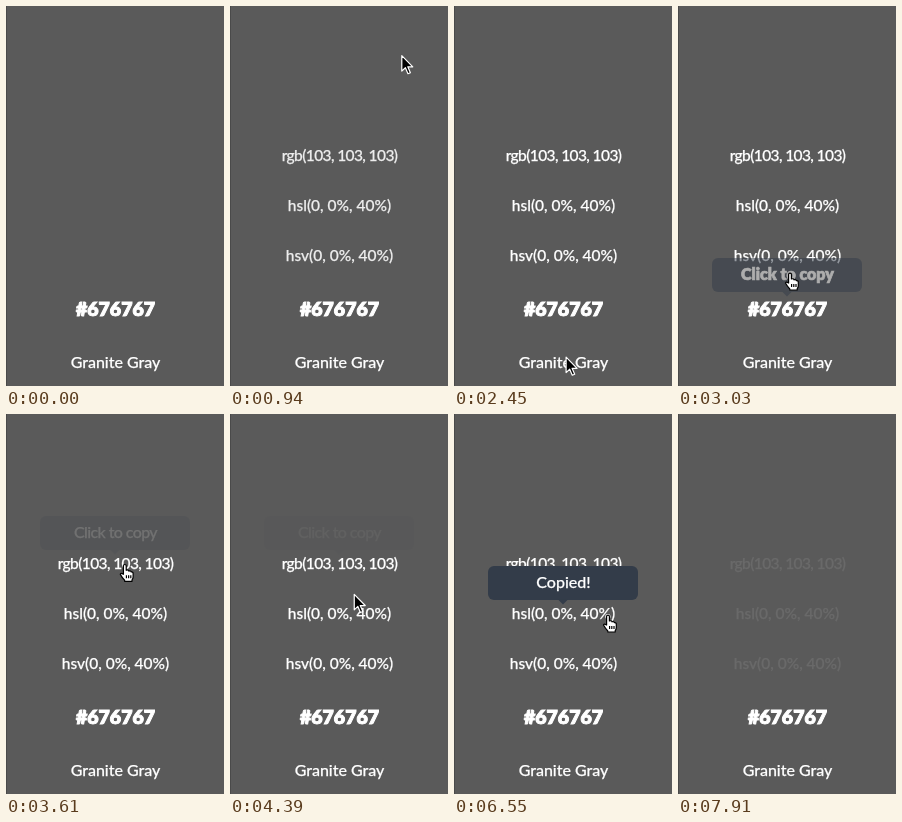
Animation, 218 px wide and 380 px high, one loop 8240 ms. Source, as an HTML page:

```html
<!DOCTYPE html>
<html lang="en">
<head>
<meta charset="utf-8">
<title>Color card</title>
<style>
  html, body { margin: 0; width: 100%; height: 100%; overflow: hidden; background: #5a5a5a; }
  svg { display: block; width: 218px; height: 380px; }
  text { font: 500 16px Lato, "Open Sans", sans-serif; fill: #fff; stroke: #fff; stroke-width: .25px; text-anchor: middle; }
  .value { font-size: 15.5px; }
  .rgb { letter-spacing: -.6px; }
  .hex { font-size: 19.5px; font-weight: 900; stroke-width: 1px; }
  .tip.hex text { font-weight: 900; stroke-width: .7px; }
  .tip rect, .tip path { fill: #333c49; }
</style>
</head>
<body>
<svg viewBox="0 0 218 380">
  <rect width="218" height="380" fill="#5a5a5a"/>
  <rect width="1" height="380" fill="#4a4a4a"/>
  <g id="labels"></g>
  <text x="109.5" y="362">Granite Gray</text>
  <g id="tips"></g>
  <g id="cursor" stroke-linejoin="round">
    <path id="arrow" fill="#000" stroke="#fff" stroke-width="1.2" d="M0 0V15.5l3.6-3.4 2.6 6 2.4-1-2.6-5.9h5z"/>
    <path id="hand" fill="#fff" stroke="#000" stroke-width="1.2" d="M-2.4 10V1.6a1.4 1.4 0 0 1 2.8 0V6q2.2-.8 2.6.8q2-.6 2.4.9q2-.3 1.9 1.8v3.3q0 1.6-1.1 2.8v1.4h-7.4v-1q-2.6-2.6-4.3-5.9q.1-1.9 3.1-.1zM.6 11v3m2.2-3v3M5 11v3"/>
  </g>
</svg>
<script>
const LOOP = 8240, TIP_FADE = 170, VALUE_FADE = 300, STEP = 5;
const ENTER = 670, LEAVE = 7880, CLICK = 4910;
const $ = id => document.getElementById(id);
const smooth = u => u * u * (3 - 2 * u);

// Cursor moves: start, end, x, y; it rests in between
const moves = [
  [670, 930, 172, 49], [930, 1120, 150, 113],
  [1390, 1875, 95, 356], [1900, 2150, 112, 356],
  [2360, 2850, 113, 302], [2850, 3030, 113, 267],
  [3210, 3800, 122, 113], [4270, 4450, 125, 203],
  [4880, 5010, 127, 215], [5010, 5150, 126, 198],
  [5640, 6000, 140, 217], [6000, 6450, 155, 201],
  [7390, 7880, 205, 322]
];

function cursorAt(t) {
  let x = 216, y = 338;
  for (const [from, to, toX, toY] of moves) {
    if (t < from) break;
    const u = smooth(Math.min(1, (t - from) / (to - from)));
    x += (toX - x) * u;
    y += (toY - y) * u;
  }
  return { x, y };
}

// Reversible fade: rises while isOn(time) holds, falls otherwise
function fade(isOn, t, duration) {
  let level = 0;
  for (let s = t - 3 * duration; s < t; s += STEP) {
    level += (isOn(s) ? STEP : -STEP) / duration;
    level = Math.max(0, Math.min(1, level));
  }
  return smooth(level);
}

const rows = [
  ["value rgb", "rgb(103, 103, 103)"],
  ["value", "hsl(0, 0%, 40%)"],
  ["value", "hsv(0, 0%, 40%)"],
  ["hex", "#676767"]
].map(([style, label], i) => {
  const mid = 150 + 50 * i, top = mid - 48;
  const baseline = style === "hex" ? mid + 9.5 : mid + 5;
  $("labels").insertAdjacentHTML("beforeend",
    `<text class="${style}" x="109.5" y="${baseline}">${label}</text>`);
  $("tips").insertAdjacentHTML("beforeend", `<g class="tip ${style}">
    <rect x="34" y="${top}" width="150" height="34" rx="6"/>
    <path d="M104 ${top + 33.5}h10l-5 5z"/>
    <text x="109.5" y="${top + 22}">Click to copy</text></g>`);
  const isOver = t => {
    const { x, y } = cursorAt(t);
    return x > 50 && x < 168 && Math.abs(y - mid) < 16;
  };
  return { mid, top, isOver, tip: $("tips").lastElementChild };
});
const values = document.querySelectorAll("#labels .value");
const copied = rows[1].tip.querySelector("text");
const isOpen = t => t > 700 && t < 7664;

function draw(t) {
  const { x, y } = cursorAt(t);
  let pointing = false;
  for (const row of rows) {
    const opacity = fade(row.isOver, t, TIP_FADE);
    row.tip.setAttribute("opacity", opacity);
    pointing ||= row.isOver(t) || (opacity > .3 && y > row.top && y < row.mid);
  }
  copied.textContent = t < CLICK ? "Click to copy" : "Copied!";

  const shown = fade(isOpen, t, VALUE_FADE);
  values.forEach(v => v.setAttribute("opacity", shown));

  $("cursor").setAttribute("transform", `translate(${x} ${y})`);
  $("cursor").setAttribute("opacity", t >= ENTER && t < LEAVE ? 1 : 0);
  $("arrow").setAttribute("opacity", pointing ? 0 : 1);
  $("hand").setAttribute("opacity", pointing ? 1 : 0);
}

const start = performance.now();
function frame() {
  // the last pose holds until the loop restarts
  draw(Math.min((performance.now() - start) % LOOP, 7910));
  requestAnimationFrame(frame);
}
frame();
</script>
</body>
</html>
```
